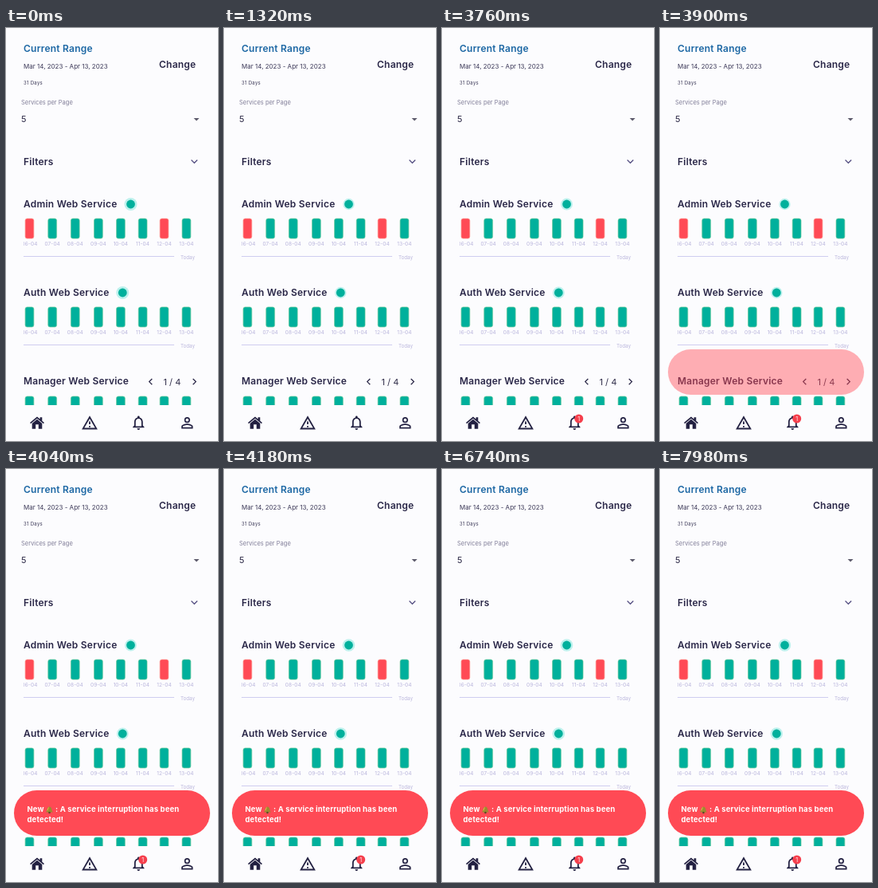
Recreate the animation shown at these times as an HTML page. Size 266 by 518 pixels, loop 8 s.

```html
<!DOCTYPE html>
<html lang="en">
<head>
<meta charset="utf-8">
<title>Service status</title>
<style>
  html, body { margin: 0; width: 100%; height: 100%; overflow: hidden; background: #fcfcfe; }
  svg { display: block; width: 266px; height: 518px; font-family: Inter, Roboto, sans-serif; }
  .title { font-size: 12px; font-weight: 600; letter-spacing: .22px; fill: #2a2748; }
  .day { font-size: 6.5px; letter-spacing: .1px; fill: #b9b5dc; text-anchor: middle; }
  .today { font-size: 6.2px; fill: #b9b5dc; text-anchor: middle; }
  .chevron { fill: none; stroke: #2b2848; stroke-width: 1.3; }
  .nav path { fill: #232142; fill-rule: evenodd; }
  .toast { font-size: 9.5px; font-weight: 700; letter-spacing: .13px; fill: #fff; }
</style>
</head>
<body>
<svg id="stage" viewBox="0 0 266 518"></svg>
<script>
const LOOP = 8000, BEAT = 858, HOLD = 100;
const BADGE_AT = 2200, TOAST_AT = 3830, TOAST_FADE = 160;
const TEAL = '#00b09c', RED = '#ff4a55';
const COLUMNS = [29.5, 58.2, 86.8, 115.9, 143.9, 171.6, 198.5, 226.4];

const text = (x, y, s, attrs) => `<text x="${x}" y="${y}" ${attrs}>${s}</text>`;
const title = (x, y, s) => text(x, y, s, 'class="title"');
const chevron = d => `<path class="chevron" d="${d}"/>`;
const icon = (x, y, d) => `<path transform="translate(${x} ${y}) scale(.9) translate(-12 -12)" d="${d}"/>`;

const bars = (y, failed = []) => COLUMNS.map((x, i) => {
  const [fill, edge] = failed.includes(i) ? [RED, '#ff9a92'] : [TEAL, '#6fcb9c'];
  return `<rect x="${x - 5.4}" y="${y}" width="10.8" height="25" rx="2.5"
    fill="${fill}" stroke="${edge}" stroke-width=".7"/>`;
}).join('');

function service(y, name, dotX, failed) {
  const days = COLUMNS.map((x, i) =>
    text(x, y + 52.2, String(i + 6).padStart(2, '0') + '-04', 'class="day"')).join('');
  return title(22, y + 4, name) +
    `<circle class="halo" cx="${dotX}" cy="${y}" fill="#bdf1ed"/>
     <circle cx="${dotX}" cy="${y}" r="5.4" fill="${TEAL}"/>` +
    bars(y + 18, failed) + `<g clip-path="url(#list)">${days}</g>` +
    `<path d="M22 ${y + 65.5}H211" stroke="#cfcdf0"/>` +
    text(228, y + 69, 'Today', 'class="today"');
}

const stage = document.getElementById('stage');
stage.innerHTML = `
  <clipPath id="list"><path d="M22 0H266V473H22z"/></clipPath>
  ${text(22, 30, 'Current Range', 'class="title" style="fill:#1c67a4"')}
  ${text(22, 51, 'Mar 14, 2023 - Apr 13, 2023', 'font-size="8" fill="#3b3857"')}
  ${text(22, 70.7, '31 Days', 'font-size="6" letter-spacing=".3" fill="#3b3857"')}
  ${title(192, 49.5, 'Change')}
  ${text(19, 96, 'Services per Page', 'font-size="7.5" fill="#817e98"')}
  ${text(19, 118.3, '5', 'font-size="11" fill="#302d4a"')}
  <path d="M235.5 113h7l-3.5 3.5z" fill="#5d5b6c"/>
  ${title(22, 171.5, 'Filters')}
  <path class="chevron" style="stroke:#565083" d="M232.5 165.5l3.8 3.8 3.8-3.8"/>
  ${service(221, 'Admin Web Service', 156.5, [0, 6])}
  ${service(332, 'Auth Web Service', 146.3)}
  ${title(22, 447, 'Manager Web Service')}
  ${chevron('M183.3 440l-3.6 3.6 3.6 3.6')}
  ${text(197.5, 447.5, '1 / 4', 'font-size="11" fill="#302d4a"')}
  ${chevron('M234.6 440l3.6 3.6-3.6 3.6')}
  <g clip-path="url(#list)">${bars(462)}</g>
  <g class="nav">
    ${icon(39, 495.5, 'M12 3L2 11.5l1.2 1.4L12 5.5l8.8 7.4 1.2-1.4L19 9V4h-3v2.4zM12 6.7L5 12.6V20h5v-6h4v6h5v-7.4z')}
    ${icon(105, 495.3, 'M12 6L19.5 19H4.5zM12 2L1 21H23zM13 16h-2v2h2zM13 10h-2v4h2z')}
    ${icon(166.3, 495, 'M12 22c1.1 0 2-.9 2-2h-4c0 1.1.9 2 2 2zM18 16v-5c0-3.07-1.63-5.64-4.5-6.32V4a1.5 1.5 0 0 0-3 0v.68C7.64 5.36 6 7.92 6 11v5l-2 2v1h16v-1zM16 17H8v-6c0-2.48 1.51-4.5 4-4.5s4 2.02 4 4.5z')}
    ${icon(227.3, 495.3, 'M12 4a4 4 0 1 0 0 8 4 4 0 0 0 0-8zM12 5.9a2.1 2.1 0 1 1 0 4.2 2.1 2.1 0 0 1 0-4.2zM12 13c-2.67 0-8 1.34-8 4v3h16v-3c0-2.66-5.33-4-8-4zM12 14.9c2.97 0 6.1 1.46 6.1 2.1v1.1H5.9V17c0-.64 3.13-2.1 6.1-2.1z')}
  </g>
  <g id="badge">
    <circle cx="171.7" cy="490" r="5.5" fill="#f53f4c"/>
    ${text(171.6, 492.5, '1', 'font-size="7" fill="#fff" text-anchor="middle"')}
  </g>
  <rect id="toast" x="10" y="403" width="246" height="57" rx="28.5" fill="${RED}"/>
  <g id="message" class="toast">
    ${text(26.5, 430, 'New', '')}
    <path d="M50 430.5c2-1.5 1.2-7 4.5-7s2.5 5.5 4.5 7z" fill="#9b8b32"/>
    <circle cx="54.5" cy="431" r="1.3" fill="#574f25"/>
    <path d="M52 428.5c.5-2 .8-3.5 2-4" fill="none" stroke="#e5bd45"/>
    ${text(62, 430, ': A service interruption has been', '')}
    ${text(26.5, 442.5, 'detected!', '')}
  </g>`;

const [badge, toast, message] = ['badge', 'toast', 'message'].map(id => document.getElementById(id));
const halos = stage.querySelectorAll('.halo');
const progress = (t, start, length) => Math.min(1, Math.max(0, (t - start) / length));

function draw(now) {
  const t = now % LOOP;
  const phase = progress(t % BEAT, HOLD, BEAT - HOLD);
  const radius = 7.6 + .4 * Math.cos(phase * 2 * Math.PI);
  halos.forEach(halo => halo.setAttribute('r', radius));
  badge.setAttribute('opacity', t >= BADGE_AT ? 1 : 0);
  toast.setAttribute('opacity', progress(t, TOAST_AT, TOAST_FADE));
  message.setAttribute('opacity', progress(t, TOAST_AT + 75, 100));
  requestAnimationFrame(() => draw(performance.now()));
}
draw(0);
</script>
</body>
</html>
```
